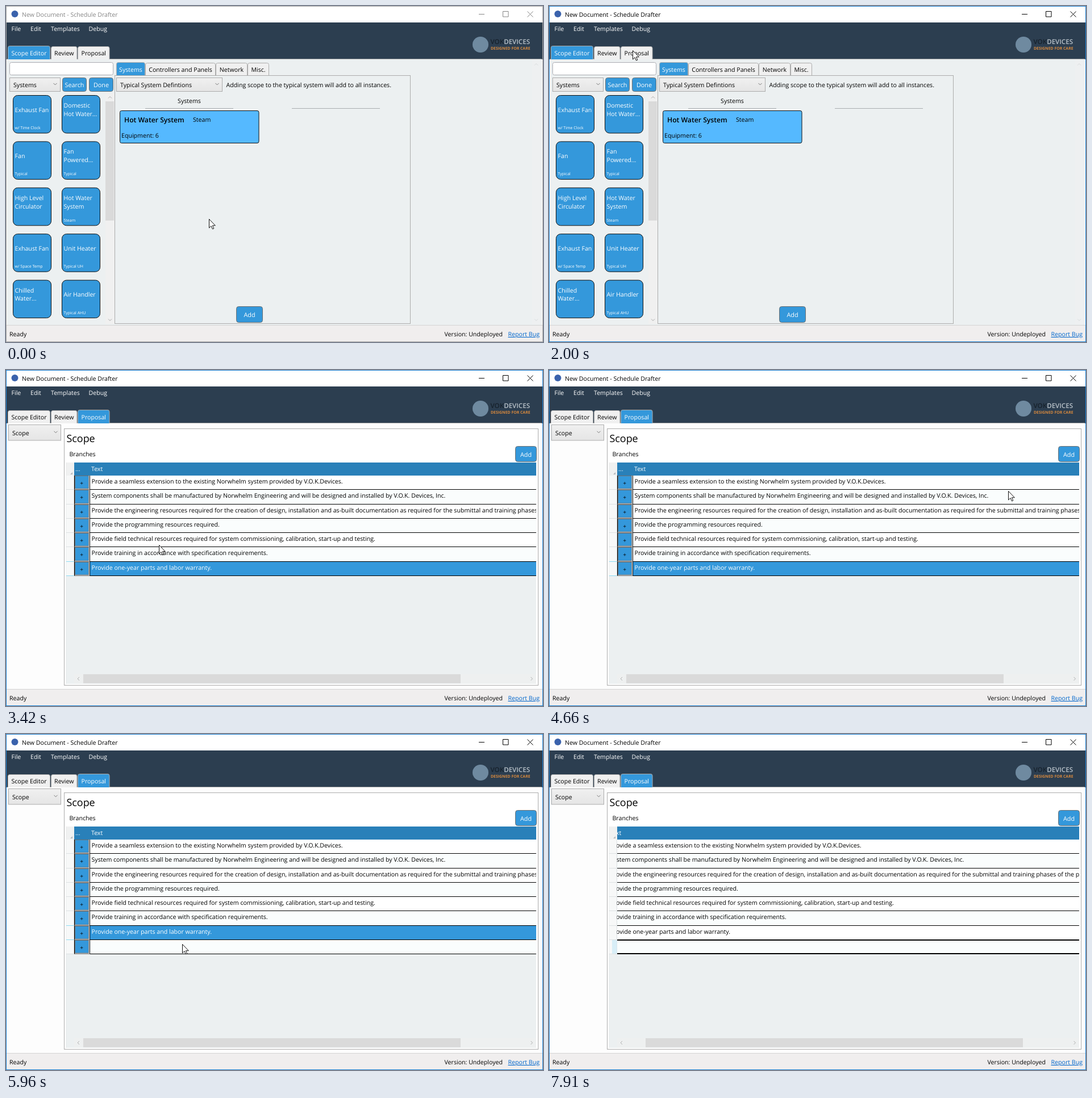
Animation, 945 px wide and 592 px high, one loop 8000 ms. Source, as an HTML page:

```html
<!DOCTYPE html>
<html lang="en">
<head>
<meta charset="utf-8">
<title>Schedule Drafter</title>
<style>
html, body { margin: 0; width: 100%; height: 100%; overflow: hidden; background: #fff; }
svg { display: block; width: 945px; height: 592px; }
text { font-family: "Open Sans", "Noto Sans", sans-serif; text-rendering: geometricPrecision; white-space: pre; }
</style>
</head>
<body>
<svg id="stage" viewBox="0 0 945 592"></svg>
<script>
const BLUE = '#3498db', DEEP = '#2980b9', PALE = '#ecf0f1', GREY = '#acacac', RIM = '#707070';
const LOOP = 8000, ACTIVATE = 1860, SWITCH = 2030, ROW_ADDED = 5430, EDIT = 6740, TYPING = 7910;
const BODY = 10.62;

const rect = (x, y, w, h, fill, stroke = 'none', r = 0, extra = '') =>
  `<rect x="${x}" y="${y}" width="${w}" height="${h}" rx="${r}" fill="${fill}" stroke="${stroke}" ${extra}/>`;
const text = (x, y, s, fill = '#000', size = BODY, extra = '') =>
  `<text x="${x}" y="${y}" fill="${fill}" font-size="${size}" ${extra}>${s}</text>`;
const mid = (x, y, s, fill, size) => text(x, y, s, fill, size, 'text-anchor="middle"');
const path = (d, stroke, fill = 'none', extra = '') =>
  `<path d="${d}" stroke="${stroke}" fill="${fill}" ${extra}/>`;
const group = (id, body, extra = '') => `<g id="${id}" ${extra}>${body}</g>`;
const chevron = (x, y, angle = 0, color = '#777') =>
  path('M-3-1.5L0 1.5 3-1.5', color, 'none', `transform="translate(${x} ${y}) rotate(${angle})"`);
const button = (x, y, w, h, label, id = '') =>
  rect(x, y, w, h, BLUE, RIM, 4, id && `id="${id}"`) + mid(x + w / 2, y + h / 2 + 4.5, label, '#fff', 10.8);
const combo = (x, y, w, h, label) =>
  rect(x, y, w, h, 'url(#face)', GREY) + text(x + 6.5, y + h / 2 + 4.5, label) + chevron(x + w - 9, y + h / 2 - 1);
const tab = (x, y, w, h, label, on) => {
  const top = on ? y : y + 1;
  return path(`M${x} ${y + h}V${top + 3}q0-3 3-3h${w - 6}q3 0 3 3V${y + h}`, GREY, on ? BLUE : '#f0f0f0') +
    mid(x + w / 2, y + h / 2 + 5, label, on ? '#fff' : '#000');
};
const mainTabs = on => path('M2 93.5H943', GREY) +
  [[3.5, 74, 'Scope Editor'], [79.5, 45.5, 'Review'], [126.5, 55.5, 'Proposal']]
    .map(([x, w, label], i) => tab(x, 70.5, w, 23.5, label, i === on)).join('');

const cards = [
  ['Exhaust Fan', 'w/ Time Clock'], ['Domestic|Hot Water...', ''],
  ['Fan', 'Typical'], ['Fan|Powered...', 'Typical'],
  ['High Level|Circulator', ''], ['Hot Water|System', 'Steam'],
  ['Exhaust Fan', 'w/ Space Temp'], ['Unit Heater', 'Typical UH'],
  ['Chilled|Water...', ''], ['Air Handler', 'Typical AHU']
];
const card = ([title, note], i) => {
  const x = i % 2 ? 98.5 : 12.5, y = 157.5 + 81.4 * (i >> 1);
  const lines = title.split('|'), first = lines.length > 1 ? 21.5 : 29;
  return rect(x, y, 67, 66.5, BLUE, '#111', 8) +
    lines.map((s, k) => text(x + 3, y + first + 14.7 * k, s, '#fff')).join('') +
    text(x + 3, y + 59.5, note, '#fff', 7);
};

const frame = () =>
  rect(0, 0, 945, 592, '#fff') +
  `<circle cx="15.5" cy="14" r="6" fill="#3a62ac"/>` +
  text(28, 18.5, 'New Document - Schedule Drafter', 'currentColor') +
  path('M832 14.5h10M874.5 9.5h9.5v9.5h-9.5zM917.5 9.5l10 10m0-10l-10 10', 'currentColor') +
  rect(1, 29, 943, 65, '#2c3e50') +
  [[9.5, 'File'], [43, 'Edit'], [79, 'Templates'], [145.5, 'Debug']].map(([x, s]) => text(x, 44, s, '#fff')).join('') +
  `<circle cx="835" cy="68" r="14" fill="#6f8aa0"/>` +
  text(852.5, 66.5, 'VOK<tspan fill="#b9c2c9">DEVICES</tspan>', '#17222c', 11.6, 'font-weight="600"') +
  text(853, 77, 'DESIGNED FOR CARE', '#d98a3e', 6.9, 'font-weight="700"') +
  rect(1, 562, 943, 29, '#f0eeee') + path('M1 562.5H944', '#d4d4d4') +
  text(6, 582, 'Ready') + text(771.5, 582, 'Version: Undeployed') +
  text(883.5, 582, 'Report Bug', '#0066cc', BODY, 'text-decoration="underline"');

const editor = () =>
  rect(2, 94, 941, 468, PALE) + mainTabs(0) +
  rect(6.5, 99.5, 182, 22, '#fff', '#abadb3', 3) +
  combo(6.5, 126.5, 89, 24, 'Systems') +
  button(99.5, 126.5, 42, 24, 'Search') + button(146.5, 126.5, 42, 24, 'Done') +
  cards.map(card).join('') +
  rect(175, 154, 16, 406, '#f0f0f0') + rect(175, 168, 15, 210, '#dadada') +
  chevron(183, 161, 180, '#aaa') + chevron(183, 553, 0, '#aaa') +
  rect(191.5, 122.5, 520, 437, PALE, GREY) +
  [[194.5, 50, 'Systems'], [245.5, 123, 'Controllers and Panels'], [369.5, 55, 'Network'], [425.5, 37, 'Misc.']]
    .map(([x, w, s], i) => tab(x, 99.5, w, 22.5, s, !i)).join('') +
  combo(194.5, 126.5, 186, 24, 'Typical System Defintions') +
  text(387.5, 143, 'Adding scope to the typical system will add to all instances.') +
  mid(322.5, 170.5, 'Systems') + path('M245 180.5H400M503 180.5H658', '#a9adb0') +
  rect(200.5, 184.5, 244.5, 57, '#55b9ff', '#111', 3) +
  text(208, 205, 'Hot Water System', '#000', 12.2, 'font-weight="600"') +
  text(329, 204, 'Steam') + text(203, 232, 'Equipment: 6') +
  button(405.5, 529.5, 46, 28, 'Add') +
  rect(926, 95, 16, 466, '#eef0f1') +
  chevron(933, 103, 180, '#d8dcdd') + chevron(933, 553, 0, '#d8dcdd');

const branches = [
  'Provide a seamless extension to the existing Norwhelm system provided by V.O.K.Devices.',
  'System components shall be manufactured by Norwhelm Engineering and will be designed and installed by V.O.K. Devices, Inc.',
  'Provide the engineering resources required for the creation of design, installation and as-built documentation as required for the submittal and training phases of the project.',
  'Provide the programming resources required.',
  'Provide field technical resources required for system commissioning, calibration, start-up and testing.',
  'Provide training in accordance with specification requirements.',
  'Provide one-year parts and labor warranty.',
  ''
];
const rowTop = i => Math.floor(185.6 + 25.25 * i) + 1;
const rowBottom = i => rowTop(i + 1) - .5;
const rowBack = i => {
  const y = rowTop(i), end = rowBottom(i);
  return rect(106, y, 827, end - y, i % 2 ? '#fafdfd' : '#fff') +
    rect(106, y, 13.5, end - y, '#f7f8f8') + path(`M106 ${end}h13.5`, '#dde1e3') +
    path(`M119.5 ${y}V${end}`, '#dde1e3') + path(`M120 ${end}H933`, '#000');
};
const rowCells = i => {
  const y = rowTop(i), end = rowBottom(i);
  return rect(120, y, 28, end - y, '#fff') + rect(121.5, y + .5, 24, end - y - 2, BLUE, RIM) +
    mid(133, y + 16.5, '+', '#000', 10) + path(`M120.5 ${y}V${end}M147.5 ${y}V${end}`, '#000') +
    text(150.5, y + 13.5, branches[i], '#000', BODY, `id="cell${i}"`);
};
const rows = (draw, from, to) => branches.slice(from, to).map((_, k) => draw(from + k)).join('');

const proposal = () =>
  rect(2, 94, 941, 468, '#fdfdfd') + mainTabs(2) +
  combo(4.5, 96.5, 92, 27.5, 'Scope') +
  rect(102.5, 103.5, 834, 452, '#fff', GREY) +
  text(106.5, 127, 'Scope', '#000', 17.9) + text(111.5, 152, 'Branches') +
  button(896.5, 134.5, 37, 27, 'Add', 'addButton') +
  rect(105, 163, 828, 390, PALE) + rect(105, 163, 15, 23, '#f0f1f1') +
  path('M117 180v4h-4z', 'none', '#b5b8ba') + rect(120, 163, 813, 23, DEEP) +
  rows(rowBack, 0, 7) + group('newBack', rowBack(7)) +
  group('picked', rect(148, 338, 785, 24, BLUE) + path('M106 337.5h13.5M106 362.5h13.5', '#8bdcf5')) +
  `<g clip-path="url(#cells)">` +
  group('scrolled', text(122, 178, '...', '#fff') + text(150, 178, 'Text', '#fff') +
    rows(rowCells, 0, 7) + group('newCells', rowCells(7))) + '</g>' +
  group('editing', rect(111, 363, 8.5, 24, '#d8eef7') + path('M120 363H933M120 387H933', '#000', 'none', 'stroke-width="2"')) +
  rect(120, 536, 813, 16, '#eef0f0') + rect(136, 536, 664, 16, '#dadada', 'none', 0, 'id="thumb"') +
  chevron(127.5, 544, 90, '#b0b0b0') + chevron(925, 544, -90, '#b0b0b0');

const stage = document.getElementById('stage');
stage.innerHTML =
  `<defs><linearGradient id="face" x2="0" y2="1"><stop stop-color="#f0f0f0"/><stop offset="1" stop-color="#e5e5e5"/></linearGradient>
  <clipPath id="cells"><path d="M119.5 163H933V536H119.5z"/></clipPath></defs>` +
  group('frame', frame()) + group('editor', editor()) + group('proposal', proposal()) +
  rect(.5, .5, 944, 591, 'none', '#aaa', 0, 'id="edge"') +
  group('arrow', path('M.5.5V16L4 12.6 6.5 18 8.8 17 6.4 11.8H11.3z', '#111', '#fff')) +
  group('beam', path('M177 368.5h2.5m1 0h2.5M180 369v13M177 382.5h2.5m1 0h2.5', '#222'));

// Pointer moves: start, end, steps, destination.
const moves = [
  [1080, 1480, 6, 150, 90], [1630, 1710, 2, 150, 81], [2000, 2000, 1, 147, 78], [2030, 2030, 1, 142, 76],
  [2470, 2530, 2, 139, 85], [3140, 3420, 5, 269, 308], [3500, 3650, 4, 293, 340], [4110, 4660, 8, 808, 213],
  [4730, 4810, 2, 857, 185], [4930, 5200, 5, 905, 146], [5430, 5960, 8, 310, 370], [6360, 6590, 4, 178, 377]
];
function pointer(t) {
  let x = 357, y = 375;
  for (const [start, end, steps, toX, toY] of moves) {
    if (t < start) break;
    const done = t >= end ? 1 : (Math.floor((t - start) / (end - start) * (steps - 1)) + 1) / steps;
    x += (toX - x) * done;
    y += (toY - y) * done;
  }
  return [Math.round(x), Math.round(y)];
}

const $ = id => document.getElementById(id);
const show = (id, on) => $(id).setAttribute('display', on ? 'inline' : 'none');

function draw(now) {
  const t = now % LOOP, active = t >= ACTIVATE, edit = t >= EDIT;
  const [x, y] = pointer(t);
  $('frame').style.color = active ? '#000' : '#858585';
  $('edge').setAttribute('stroke', active ? '#1b80d2' : '#a5a5a5');
  show('editor', t < SWITCH);
  show('proposal', t >= SWITCH);
  show('newBack', t >= ROW_ADDED);
  show('newCells', t >= ROW_ADDED);
  show('picked', !edit);
  show('editing', edit);
  $('cell6').setAttribute('fill', edit ? '#000' : '#fff');
  $('scrolled').setAttribute('transform', `translate(${edit ? -43 : 0} 0)`);
  $('thumb').setAttribute('x', edit ? 170 : 136);
  $('addButton').setAttribute('fill', x > 896 && y > 134 && y < 162 ? '#4aa8e6' : BLUE);
  $('arrow').setAttribute('transform', `translate(${x} ${y})`);
  show('arrow', !edit);
  show('beam', edit && t < TYPING);
  requestAnimationFrame(draw);
}
draw(0);
</script>
</body>
</html>
```
